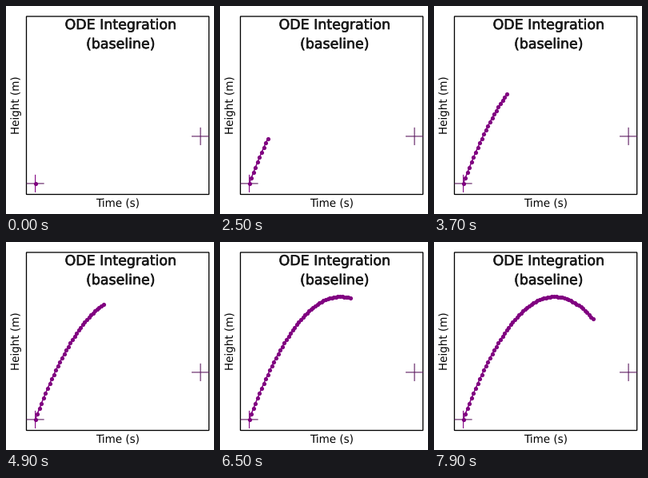
A matplotlib script that plays this animation: 260x260 px, repeating every 8000 ms.

```python
import matplotlib.pyplot as plt
import numpy as np
from matplotlib.animation import FuncAnimation
from matplotlib.patches import Rectangle
from matplotlib.patheffects import withStroke

SIZE, DPI = 260, 100
PX = 72 / DPI                     # points per pixel
FRAMES, STEP_MS, HOLD = 80, 100, 16
PURPLE, DARK, INK = "#800080", "#5c1a60", "#1a1a1a"

plt.rcParams.update({"font.family": "DejaVu Sans", "text.hinting": "none"})
fig = plt.figure(figsize=(SIZE / DPI, SIZE / DPI), dpi=DPI, facecolor="white")
ax = fig.add_axes([0, 0, 1, 1])
ax.set(xlim=(0, SIZE), ylim=(SIZE, 0))
ax.axis("off")


def label(x, y, text, size, **style):
    return ax.text(x, y, text, fontsize=size * PX, ha="center", va="baseline",
                   rotation_mode="anchor", **style)


def cross(x, y, color_h, color_v, arm=10.5):
    style = dict(lw=1.1 * PX, snap=False, zorder=2)
    ax.plot([x - arm, x + arm], [y, y], color=color_h, **style)
    ax.plot([x, x], [y - arm, y + arm], color=color_v, **style)


def height(n):
    return 6.97 * n - 0.079 * n**2


ax.add_patch(Rectangle((25.5, 13), 228.2, 222.5, fill=False, ec="black",
                       lw=1.3 * PX, snap=False))
for y, line in ((29, "ODE Integration"), (53, "(baseline)")):
    label(143.2, y, line, 17.4, color=INK,
          path_effects=[withStroke(linewidth=0.6 * PX, foreground=INK)])
label(139.6, 251, "Time (s)", 13.5)
label(17, 124, "Height (m)", 13.5, rotation=90)

cross(36.6, 221.9, DARK, PURPLE)
cross(243.1, 162.9, DARK, DARK)

n = np.arange(FRAMES - HOLD)
path_x, path_y = 36.5 + 2.58 * n, 222 - height(n)
trail, = ax.plot([], [], "-o", color=PURPLE, lw=1.5 * PX, ms=5.2 * PX,
                 mew=0, snap=False, zorder=3)


def update(i):
    count = max(1, i - HOLD + 1)
    trail.set_data(path_x[:count], path_y[:count])
    return trail,


anim = FuncAnimation(fig, update, frames=FRAMES, interval=STEP_MS,
                     repeat=True, repeat_delay=0)
plt.show()
```
